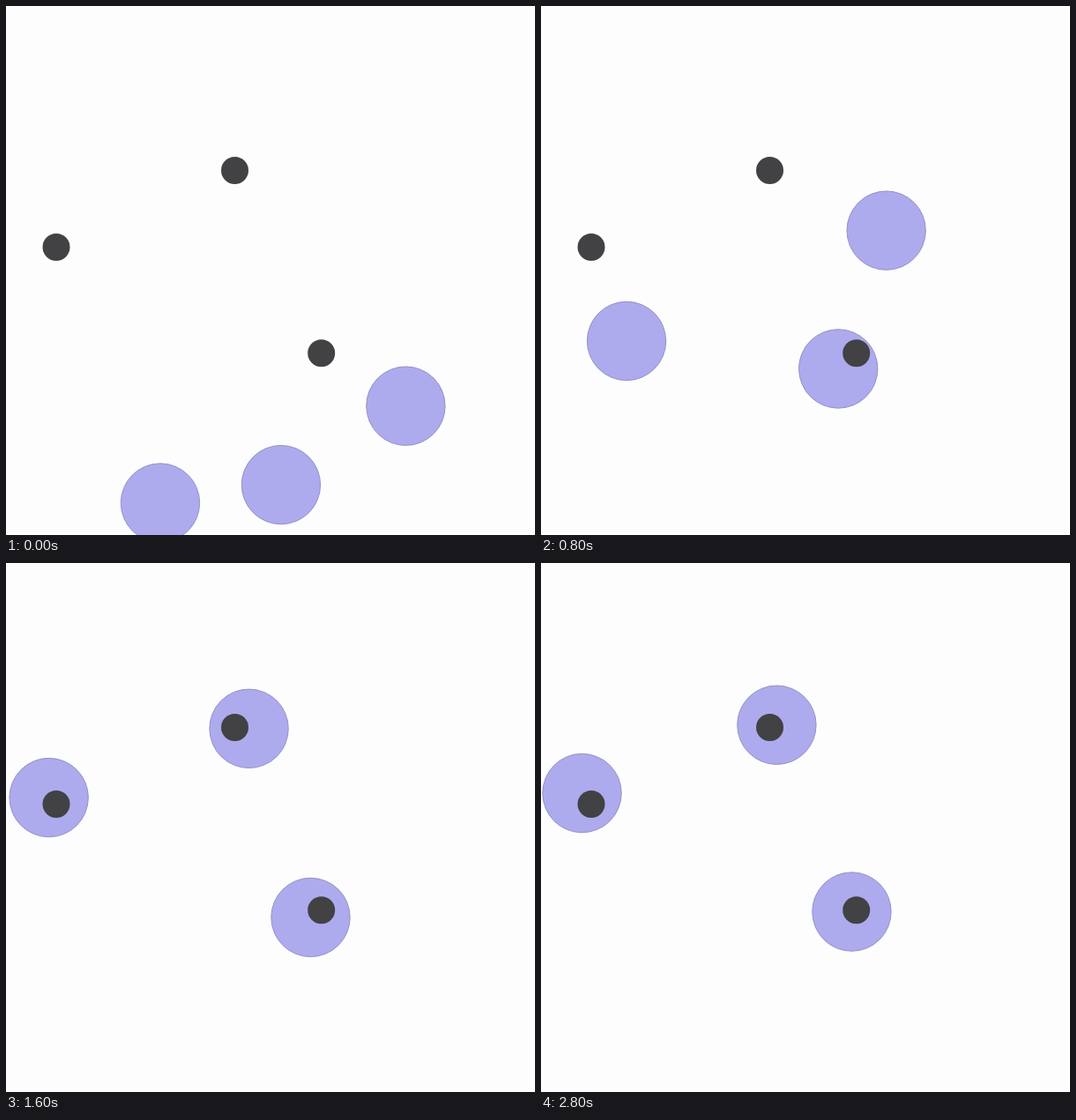
Write an HTML page with a canvas that moves like this. It is 600x600 px and loops after 2.9 s.

```html
<!DOCTYPE html>
<html lang="en">
<head>
<meta charset="utf-8">
<title>Circles chasing dots</title>
<style>
  html, body { margin: 0; width: 100%; height: 100%; overflow: hidden; background: #fefdfe; }
  canvas { display: block; }
</style>
</head>
<body>
<canvas id="stage" width="600" height="600"></canvas>
<script>
const ctx = document.getElementById('stage').getContext('2d');
const LOOP = 2900, STEP = 100;

const dots = [{ x: 259.5, y: 186.5 }, { x: 57, y: 273.5 }, { x: 357.7, y: 393.7 }];

// Each circle settles at (x, y) as its offsets fade away.
const circles = [
  { x: 46.5, y: 261, fades: [
    { dx: 138, dy: 325, mid: 5.78, rate: 0.45 },
  ] },
  { x: 353, y: 395.2, fades: [
    { dx: -20, dy: 152, mid: 2.94, rate: 0.775 },
    { dx: -28, dy: 0, mid: 8.3, rate: 0.7 },
    { dx: 15, dy: 4, mid: 13.5, rate: 1 },
    { dx: -10, dy: 6, mid: 23.5, rate: 0.8 },
  ] },
  { x: 267.3, y: 183.7, fades: [
    { dx: -8, dy: 217, mid: 3.2, rate: 0.62 },
    { dx: 155, dy: 60, mid: 7.6, rate: 0.62 },
    { dx: 40, dy: 20, mid: 11, rate: 0.4 },
  ] },
];

function place({ x, y, fades }, step) {
  for (const { dx, dy, mid, rate } of fades) {
    const left = 1 / (1 + Math.exp(rate * (step - mid)));
    x += dx * left;
    y += dy * left;
  }
  return { x, y };
}

function disc({ x, y }, radius, fill, stroke) {
  ctx.beginPath();
  ctx.arc(x, y, radius, 0, 2 * Math.PI);
  ctx.fillStyle = fill;
  ctx.fill();
  if (stroke) {
    ctx.strokeStyle = stroke;
    ctx.stroke();
  }
}

function draw(now) {
  const tick = Math.floor((now % LOOP) / STEP);
  const step = tick > 6 ? tick - 1 : tick; // the motion rests for one step at 700 ms
  ctx.fillStyle = '#fefdfe';
  ctx.fillRect(0, 0, 600, 600);
  for (const circle of circles) disc(place(circle, step), 44.7, '#adabee', '#9492c4');
  for (const dot of dots) disc(dot, 15.5, '#424143');
}

function frame() {
  draw(performance.now());
  requestAnimationFrame(frame);
}
frame();
</script>
</body>
</html>
```
